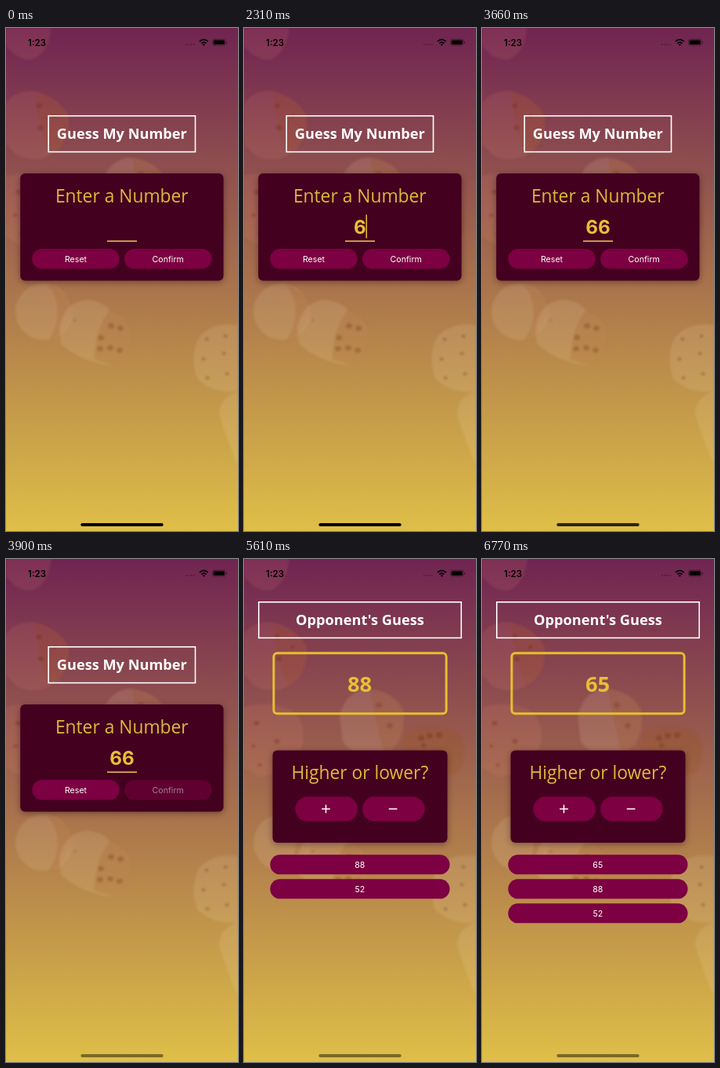
Recreate the animation shown at these times as an HTML page. Size 296 by 640 pixels, loop 8 s.

```html
<!DOCTYPE html>
<html lang="en">
<head>
<meta charset="utf-8">
<title>Guess My Number</title>
<style>
  html, body { margin: 0; width: 100%; height: 100%; overflow: hidden; }
  svg { display: block; width: 100vw; height: 100vh; }
  text { text-anchor: middle; fill: #fff; font: 10.6px Inter, Roboto, sans-serif; }
  .title { font: bold 18.2px "Open Sans", sans-serif; }
  .ask { font: 22.8px "Open Sans", sans-serif; fill: #e0b93a; }
  .guess { font: bold 27.3px "Open Sans", sans-serif; fill: #e6bf38; }
  .entry { font: bold 24.3px Inter, sans-serif; fill: #e6bf38; }
  .clock { font: 600 11.4px Inter, sans-serif; fill: #000; }
  .frame { fill: none; stroke: #fff; stroke-width: 1.6; }
  .card { fill: #43001f; filter: drop-shadow(0 2px 4px rgba(30, 0, 15, .4)); }
  .btn { fill: #7c0042; }
  .icon { stroke: #fff; stroke-width: 1.5; stroke-linecap: round; }
  .light { fill: #ffe6c0; opacity: .13; }
  .rose { fill: #ff9d80; opacity: .11; }
  .shade { fill: #9a4a10; opacity: .17; }
  .pip { fill: #5c2008; opacity: .26; }
</style>
</head>
<body>
<svg viewBox="0 0 296 640" preserveAspectRatio="none">
  <defs>
    <linearGradient id="sky" x2="0" y2="1">
      <stop stop-color="#702451"/>
      <stop offset="1" stop-color="#dfbf48"/>
    </linearGradient>
    <filter id="soft"><feGaussianBlur stdDeviation="1.6"/></filter>
  </defs>
  <rect width="296" height="640" fill="url(#sky)"/>

  <g id="dice" filter="url(#soft)">
    <path class="rose" d="M0 0H58Q54 32 34 40Q14 42 0 22Z"/>
    <path class="rose" d="M0 96Q10 80 34 80Q66 86 80 112Q82 148 56 162Q36 172 14 162L0 148Z"/>
    <path class="shade" d="M36 81Q68 88 80 112Q82 148 56 162Q40 130 36 81Z"/>
    <path class="rose" d="M0 188Q40 178 66 196Q84 220 70 248Q50 276 20 277L0 266Z"/>
    <path class="light" d="M122 200Q130 166 160 165Q196 170 204 196Q206 236 178 249Q140 254 126 232Z"/>
    <path class="shade" d="M160 165Q196 170 204 196Q206 236 178 249Q166 205 160 165Z"/>
    <path class="shade" d="M208 218Q240 206 272 220Q290 244 272 272Q236 284 212 262Q194 240 208 218Z"/>
    <circle class="light" cx="48" cy="361" r="36"/>
    <path class="shade" d="M52 326Q84 334 84 361Q78 390 54 397Q78 358 52 326Z"/>
    <path class="light" d="M68 380Q76 348 102 346Q124 347 132 359Q160 370 160 393Q152 424 138 430Q98 426 70 402Z"/>
    <path class="shade" d="M132 359Q160 370 160 393Q152 424 138 430L112 422Q114 380 132 359Z"/>
    <path class="light" d="M296 378Q262 374 246 394Q234 418 244 446Q264 466 296 462Z"/>
    <path class="light" d="M296 462Q272 470 272 492Q284 530 296 556Z"/>
  </g>

  <text class="clock" x="39.5" y="22.8">1:23</text>
  <g fill="#000">
    <path d="M229 21h2m1.300 0h2m1.300 0h2m1.300 0h2" stroke="#000" stroke-width="1.6" opacity=".3"/>
    <g fill="none" stroke="#000" stroke-width="1.7">
      <path d="M247 17.200Q252.300 12.200 257.700 17.200M249.300 19.500Q252.300 16.800 255.400 19.500"/>
    </g>
    <path d="M250.700 20.900Q252.300 19.600 254 20.900L252.300 22.700Z"/>
    <rect x="263.500" y="14.300" width="16.500" height="8" rx="2.400" fill="none" stroke="#000" stroke-width=".7" opacity=".5"/>
    <rect x="264.700" y="15.500" width="14.100" height="5.600" rx="1.400"/>
    <rect x="280.900" y="17" width="1" height="2.800" rx=".5" opacity=".5"/>
  </g>

  <g id="start">
    <rect class="frame" x="54.200" y="111.800" width="187.300" height="45.800"/>
    <text class="title" x="147.800" y="141.200">Guess My Number</text>
    <rect class="card" x="18.200" y="185" width="259.300" height="136.500" rx="6"/>
    <text class="ask" x="147.800" y="222">Enter a Number</text>
    <text class="entry" id="entry" x="148" y="262"></text>
    <rect id="caret" y="237.500" width="1.500" height="30" fill="#e6bf38"/>
    <rect x="129" y="270.400" width="38" height="1.600" fill="#e6b955"/>
    <rect class="btn" x="33.300" y="281" width="111.500" height="25.500" rx="12.700"/>
    <text x="89" y="297.600">Reset</text>
    <g id="confirm">
      <rect class="btn" x="151" y="281" width="111.500" height="25.500" rx="12.700"/>
      <text x="206.700" y="297.600">Confirm</text>
    </g>
  </g>

  <g id="game">
    <rect class="frame" x="18.800" y="54.800" width="258.400" height="45.600"/>
    <text class="title" x="147.900" y="83.800">Opponent's Guess</text>
    <rect x="37.900" y="119.700" width="220.200" height="77" rx="4.500" fill="none" stroke="#e6bf30" stroke-width="3"/>
    <text class="guess" id="guess" x="147.500" y="169"></text>
    <rect class="card" x="36.500" y="243.500" width="223" height="117.500" rx="6"/>
    <text class="ask" x="147.800" y="280">Higher or lower?</text>
    <g id="plus">
      <rect class="btn" x="65.300" y="302.300" width="79.700" height="31.500" rx="15.700"/>
      <path class="icon" d="M99.700 318h9.600m-4.800-4.800v9.600"/>
    </g>
    <g id="minus">
      <rect class="btn" x="151" y="302.300" width="79.700" height="31.500" rx="15.700"/>
      <path class="icon" d="M185.300 318h9.600"/>
    </g>
    <g id="rows"></g>
  </g>
  <rect id="home" x="95.300" y="630" width="105.400" height="3.900" rx="1.950"/>
</svg>
<script>
const LOOP = 8000;
const $ = id => document.getElementById(id);

// Dice pips: x, y, radius
[[42, 99, 4], [44, 127, 4], [62, 112, 3], [16, 209, 4], [42, 232, 4], [20, 262, 3], [12, 238, 3],
 [172, 186, 4], [186, 212, 4], [226, 228, 4], [237, 225, 4], [249, 224, 4], [229, 237, 3],
 [134, 379, 4], [146, 382, 4], [121, 394, 4], [133, 407, 4], [145, 410, 4], [120, 408, 4],
 [88, 372, 2], [256, 396, 3], [280, 392, 3], [252, 421, 3], [278, 414, 3], [257, 445, 3], [282, 440, 3]]
  .forEach(([x, y, r]) => {
    $("dice").innerHTML += `<ellipse class="pip" cx="${x}" cy="${y}" rx="${r}" ry="${r * .85}"/>`;
  });

// Value of the last [time, value] step reached
const at = (t, steps) => steps.filter(s => s[0] <= t).pop()[1];
const show = (id, opacity) => $(id).setAttribute("opacity", opacity);
const write = (id, text) => { if ($(id).textContent !== text) $(id).textContent = text; };

const rows = [0, 1, 2].map(i => {
  const y = 376.3 + 31 * i;
  $("rows").innerHTML += `<g id="row${i}"><rect class="btn" x="33.3" y="${y}" width="229.2" height="25" rx="12.5"/>
    <text id="past${i}" x="147.8" y="${y + 16.3}"></text></g>`;
  return i;
});

function draw(t) {
  const entry = at(t, [[0, ""], [2190, "6"], [2550, "66"]]);
  write("entry", entry);
  $("caret").setAttribute("x", 147.5 + 8 * entry.length);
  show("caret", at(t, [[0, 0], [1620, 1], [3370, .5], [3660, 0]]));
  show("confirm", at(t, [[0, 1], [3780, .5]]));
  show("home", at(t, [[0, 1], [3660, .8], [3780, .6], [3900, .45]]));

  const playing = t >= 5490;
  $("start").style.display = playing ? "none" : "";
  $("game").style.display = playing ? "" : "none";
  show("plus", at(t, [[0, .5], [5610, 1]]));
  show("minus", at(t, [[0, 1], [6620, .5], [6770, 1]]));

  const past = at(t, [[0, ["52"]], [5610, ["88", "52"]], [6770, ["65", "88", "52"]]]);
  write("guess", past[0]);
  rows.forEach(i => {
    show("row" + i, i < past.length ? 1 : 0);
    write("past" + i, past[i] || "");
  });
}

const begin = performance.now();
function tick() {
  draw((performance.now() - begin) % LOOP);
  requestAnimationFrame(tick);
}
tick();
</script>
</body>
</html>
```
